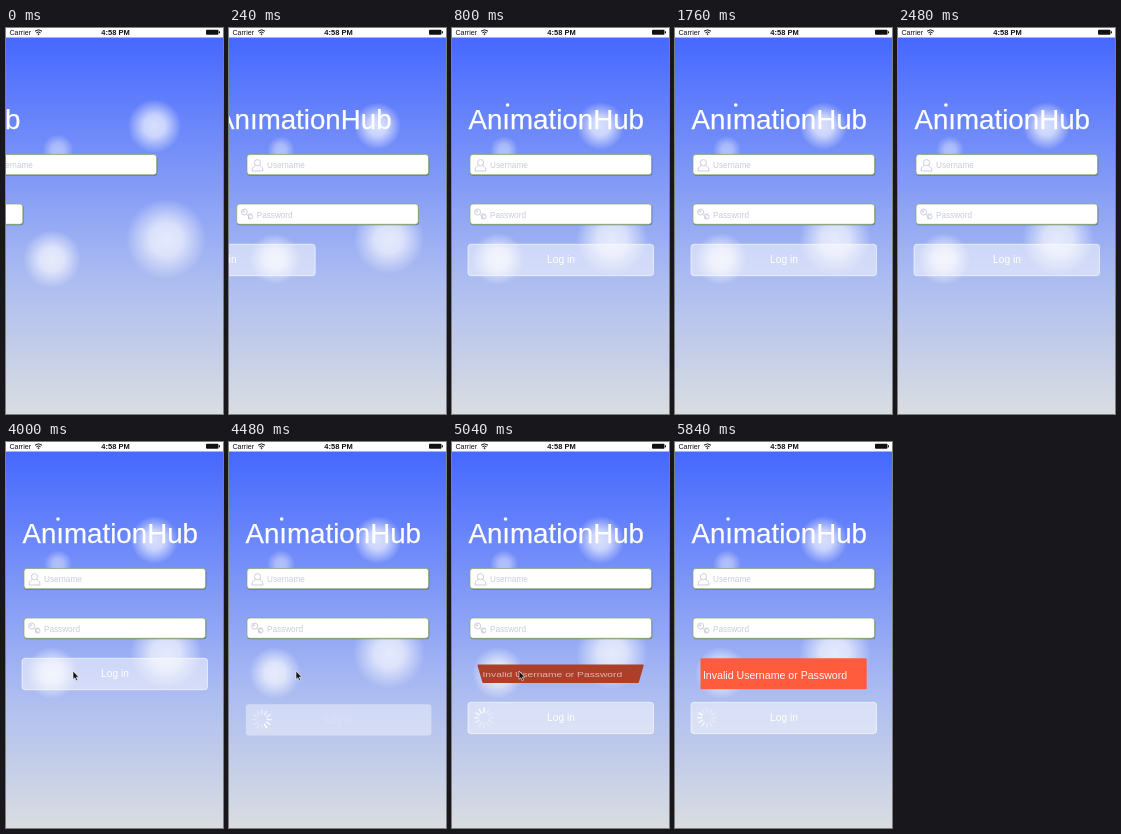
Animation of 217x386 px, one loop 5.92 s. Source, as an HTML page:

```html
<!DOCTYPE html>
<html lang="en">
<head>
<meta charset="utf-8">
<title>Login animation</title>
<style>
  html, body { margin: 0; width: 100%; height: 100%; overflow: hidden; }
  svg { display: block; width: 100vw; height: 100vh; }
  text { font-family: "Liberation Sans", Arial, sans-serif; }
  .hint { font-size: 8.2px; fill: #c8cbdc; }
  .icon { fill: none; stroke: #c6c9da; stroke-width: .9; }
</style>
</head>
<body>
<svg viewBox="0 0 217 386">
  <defs>
    <linearGradient id="sky" x1="0" y1="0" x2="0" y2="1">
      <stop offset="0" stop-color="#4568ff"/>
      <stop offset=".65" stop-color="#adbdf1"/>
      <stop offset="1" stop-color="#d9dde1"/>
    </linearGradient>
    <radialGradient id="glow">
      <stop offset="0" stop-color="#fff" stop-opacity=".74"/>
      <stop offset=".4" stop-color="#fff" stop-opacity=".64"/>
      <stop offset=".7" stop-color="#fff" stop-opacity=".32"/>
      <stop offset="1" stop-color="#fff" stop-opacity="0"/>
    </radialGradient>
    <g id="box">
      <rect x="18.3" y="1.3" width="182" height="20.5" rx="3" fill="#3f5a52" opacity=".6"/>
      <rect x="18" y=".5" width="181.6" height="20.3" rx="3" fill="#fff" stroke="#86a562" stroke-width=".7"/>
    </g>
  </defs>

  <rect y="9" width="217" height="377" fill="url(#sky)"/>
  <g id="bubbles" fill="url(#glow)"></g>

  <g id="title">
    <text x="16.5" y="100.6" font-size="27.7" fill="#fff" stroke="#fff" stroke-width=".25">AnımationHub</text>
  </g>
  <circle id="dot" cy="77" r="1.8" fill="#fff"/>

  <g id="user">
    <use href="#box" y="126"/>
    <g class="icon">
      <circle cx="28.5" cy="134.7" r="3.1"/>
      <path d="M26.6 137.3C24 138.6 23 140 23 143H34C34 140 33 138.6 30.4 137.3"/>
    </g>
    <text class="hint" x="38" y="140">Username</text>
  </g>

  <g id="pass">
    <use href="#box" y="175.5"/>
    <g class="icon">
      <circle cx="25.6" cy="184" r="3"/>
      <circle cx="25" cy="183.4" r=".8"/>
      <path d="M27.8 186.2L32 190.5M29.4 186.2L33.5 186.2M30 188.6V191.2"/>
      <circle cx="31.8" cy="188.8" r="2.2"/>
    </g>
    <text class="hint" x="38" y="189.7">Password</text>
  </g>

  <g id="warn">
    <polygon id="panel" stroke-width="2" stroke-linejoin="round"/>
    <text id="msg" x="-80.7" y="5.3" font-size="10.6" fill="#fff">Invalid Username or Password</text>
  </g>

  <g id="button">
    <rect id="face" x="16" y="216.3" width="185.5" height="31.4" rx="3" fill="#fff" stroke="#fff"/>
    <text id="label" x="109" y="235.3" font-size="10.2" fill="#fff" text-anchor="middle">Log in</text>
    <g id="spinner" transform="translate(32 231.7)" stroke="#fff" stroke-width="1.5" stroke-linecap="round"></g>
  </g>

  <path id="cursor" d="M67 229V237.4L68.9 235.7L70.2 238.7L71.6 238.1L70.3 235.2H72.8Z" fill="#111" stroke="#fff" stroke-width=".6"/>

  <rect width="217" height="9.5" fill="#fff"/>
  <text x="3.4" y="6.8" font-size="7.1" fill="#111">Carrier</text>
  <g fill="none" stroke="#111" stroke-width="1">
    <path d="M29 3.2Q32.5 .4 36 3.2M30.4 4.8Q32.5 3.1 34.6 4.8"/>
    <circle cx="32.5" cy="6.2" r=".5"/>
  </g>
  <text x="109.5" y="6.8" font-size="7.5" font-weight="bold" fill="#111" text-anchor="middle">4:58 PM</text>
  <rect x="200" y="1.8" width="12.5" height="5" rx="1" fill="#111"/>
  <rect x="213" y="3.3" width="1" height="2" fill="#111"/>
</svg>
<script>
const LOOP = 5920, STEP = 80, WIDTH = 217;
const $ = id => document.getElementById(id);
const clamp = u => Math.min(1, Math.max(0, u));
const ease = u => .5 - .5 * Math.cos(Math.PI * clamp(u));
const ramp = (t, start, length) => ease((t - start) / length);
const ring = (sec, decay, speed) => sec < 0 ? 1 : Math.exp(-decay * sec) * Math.cos(speed * sec);
const move = (id, x, y = 0) => $(id).setAttribute('transform', `translate(${x} ${y})`);

function add(parent, tag, attrs) {
  const el = document.createElementNS('http://www.w3.org/2000/svg', tag);
  for (const key in attrs) el.setAttribute(key, attrs[key]);
  return parent.appendChild(el);
}

const bubbles = [[148.5, 98, 24, 1], [52, 122, 14, .6], [160, 211, 36, 1], [46, 231, 26, 1]]
  .map(([cx, cy, r, opacity]) => ({ r, el: add($('bubbles'), 'circle', { cx, cy, opacity }) }));

const BLADES = 12;
const blades = Array.from({ length: BLADES }, (_, i) =>
  add($('spinner'), 'line', { y1: -5.4, y2: -9.4, transform: `rotate(${i * 360 / BLADES})` }));

function drawWarning(t) {
  // Only the second half of the flip shows the panel.
  const angle = Math.PI * (1 - ramp(t, 4850, 300));
  const shown = angle < Math.PI / 2 - .1;
  $('warn').style.display = shown ? '' : 'none';
  if (!shown) return;
  const c = Math.cos(angle), s = Math.sin(angle);
  // The round outline adds one pixel on every side.
  const h = 15.5 * c - 1, top = 82.1, bottom = top - 6 * s;
  move('warn', 108.6, 231.7);
  const shade = 1 - .4 * s;
  const color = `rgb(${[255, 91, 60].map(v => Math.round(v * shade))})`;
  $('panel').setAttribute('points', `${-top},${-h} ${top},${-h} ${bottom},${h} ${-bottom},${h}`);
  $('panel').setAttribute('fill', color);
  $('panel').setAttribute('stroke', color);
  $('msg').setAttribute('transform', `scale(${1 - .04 * s} ${c})`);
  $('msg').setAttribute('opacity', .95 - .4 * s);
}

function drawButton(t) {
  const bounce = ring((t - 4200) / 1000, 10, 14);
  const clicked = t >= 4200;
  const enter = -WIDTH * (1 - ramp(t, 0, 500));
  move('button', clicked ? -20 * bounce : enter, clicked ? 44 * (1 - bounce) : 0);
  const pressed = ramp(t, 4080, 120) * (1 - ramp(t, 4460, 320));
  $('label').setAttribute('opacity', 1 - .85 * pressed);
  $('face').setAttribute('fill-opacity', .5 - .1 * pressed);
  $('face').setAttribute('stroke-opacity', .6 * (1 - pressed));
  $('spinner').style.display = clicked ? '' : 'none';
  const head = Math.floor(t / 1000 * BLADES);
  blades.forEach((el, i) => {
    const age = ((head - i) % BLADES + BLADES) % BLADES;
    el.setAttribute('opacity', Math.max(.3, 1 - age / 9));
  });
}

function draw(t) {
  const sec = t / 1000;
  const size = 1 + .12 * ring(sec, 7, 14);
  bubbles.forEach(b => b.el.setAttribute('r', b.r * size));

  const slide = (id, start, length) => move(id, -WIDTH * (1 - ramp(t, start, length)));
  slide('title', -140, 500);
  slide('user', -274, 400);
  slide('pass', -104, 400);
  $('dot').setAttribute('cx', 53.3 - WIDTH / 2 * ring(sec - .213, 1.1, 13.45));

  drawButton(t);
  drawWarning(t);
  $('cursor').style.display = t >= 3840 && t < 5360 ? '' : 'none';
}

const begin = performance.now();
function tick() {
  const t = (performance.now() - begin) % LOOP;
  draw(Math.floor(t / STEP) * STEP);
  requestAnimationFrame(tick);
}
tick();
</script>
</body>
</html>
```
